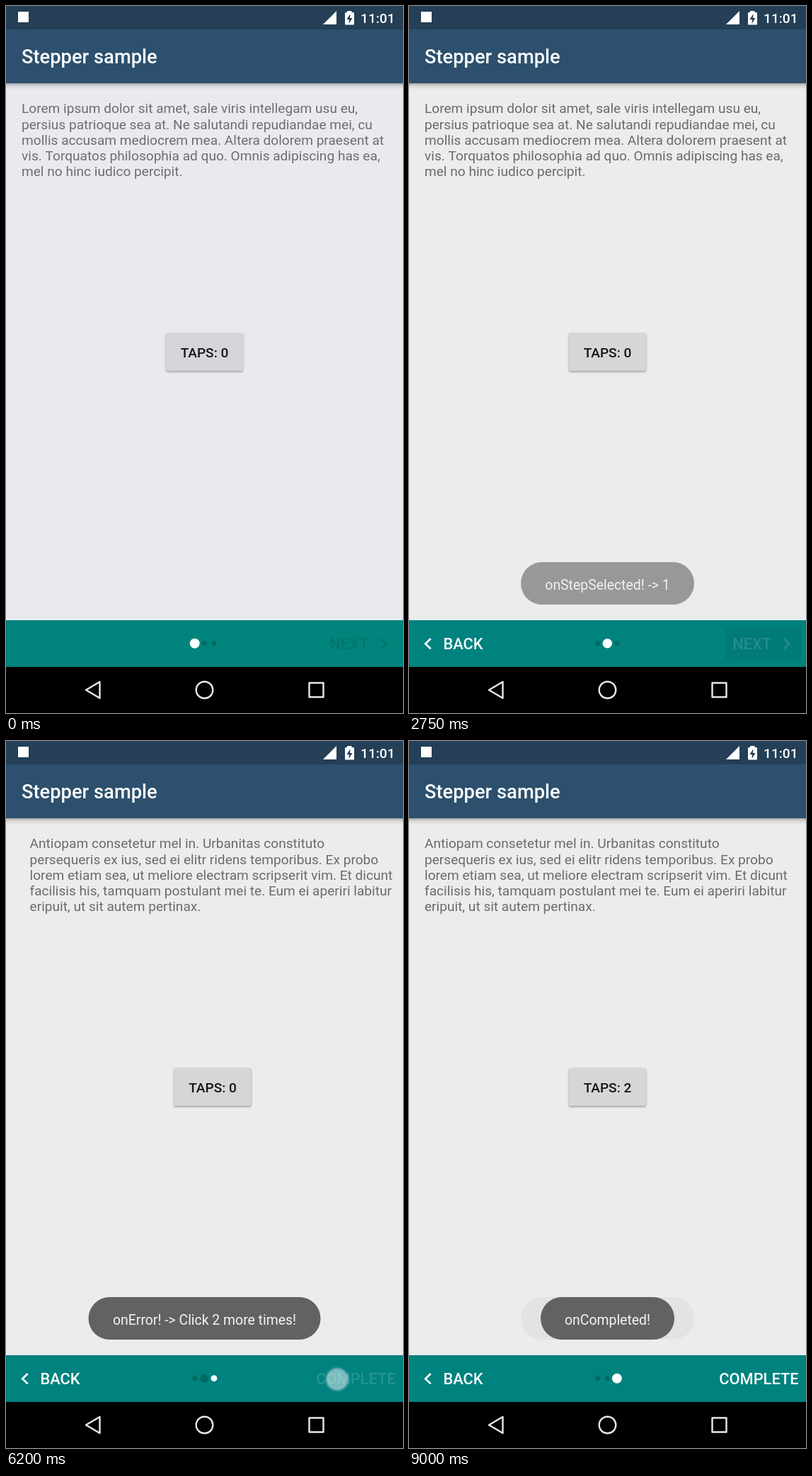
Animation, 561 px wide and 998 px high, one loop 9.25 s. Source, as an HTML page with a canvas:

```html
<!DOCTYPE html>
<html lang="en">
<head>
<meta charset="utf-8">
<title>Stepper sample</title>
<style>
  html, body { margin: 0; width: 100%; height: 100%; overflow: hidden; background: #000; }
  canvas { display: block; width: 561px; height: 998px; }
</style>
</head>
<body>
<canvas id="stage" width="561" height="998"></canvas>
<script>
const W = 561, H = 998, LOOP = 9250, TICK = 50;
const stage = document.getElementById('stage').getContext('2d');
const layer = document.createElement('canvas');
layer.width = W;
layer.height = H;
const layerCtx = layer.getContext('2d');
let g = stage;

const LOREM = [
  'Lorem ipsum dolor sit amet, sale viris intellegam usu eu,',
  'persius patrioque sea at. Ne salutandi repudiandae mei, cu',
  'mollis accusam mediocrem mea. Altera dolorem praesent at',
  'vis. Torquatos philosophia ad quo. Omnis adipiscing has ea,',
  'mel no hinc iudico percipit.'
];
const ANTIOPAM = [
  'Antiopam consetetur mel in. Urbanitas constituto',
  'persequeris ex ius, sed ei elitr ridens temporibus. Ex probo',
  'lorem etiam sea, ut meliore electram scripserit vim. Et dicunt',
  'facilisis his, tamquam postulant mei te. Eum ei aperiri labitur',
  'eripuit, ut sit autem pertinax.'
];
const PAGES = [LOREM, LOREM, ANTIOPAM];

// Times at which steps 1 and 2 are selected, and the two counted taps per page.
const SELECT = [2500, 6092];
const COUNTS = [[1550, 1850], [4450, 4750], [7100, 7400]];

const TOASTS = [
  { text: 'onStepSelected! -> 1', half: 122.5, from: 2565, to: 4515 },
  { text: 'onError! -> Click 2 more times!', half: 164, from: 4515, to: 6515 },
  { text: 'onStepSelected! -> 2', half: 122.5, from: 6515, to: 8515 },
  { text: 'onCompleted!', half: 94.5, from: 8515, to: Infinity }
];

const TOUCHES = [
  { x: 253, y: 489, down: 1400, up: 1550, gone: 1700 },
  { x: 253, y: 489, down: 1700, up: 1850, gone: 2050 },
  { x: 480, y: 905, down: 2350, up: 2490, gone: 2700 },
  { x: 489, y: 903, down: 3400, up: 3550, gone: 3800 },
  { x: 253, y: 489, down: 4300, up: 4450, gone: 4600 },
  { x: 253, y: 489, down: 4600, up: 4750, gone: 4950 },
  { x: 468, y: 901, down: 6050, up: 6120, gone: 6300 },
  { x: 253, y: 489, down: 7000, up: 7100, gone: 7250 },
  { x: 253, y: 489, down: 7300, up: 7400, gone: 7550 },
  { x: 480, y: 909, down: 8350, up: 8500, gone: 8700 }
];

const clamp = v => Math.max(0, Math.min(1, v));
const roboto = (size, weight = 400) => `${weight} ${size}px Roboto, sans-serif`;
const toastFont = pickToastFont();

// Uses the condensed face when there is one, else a smaller regular size.
function pickToastFont() {
  const condensed = 'condensed 21.8px Roboto, sans-serif';
  const width = font => {
    stage.font = font;
    return stage.measureText(TOASTS[0].text).width;
  };
  return width(condensed) < width(roboto(21.8)) - 5 ? condensed : roboto(19.4);
}

function rect(x, y, w, h, color) {
  g.fillStyle = color;
  g.fillRect(x, y, w, h);
}

function pill(x, y, w, h, r, color) {
  g.fillStyle = color;
  g.beginPath();
  g.roundRect(x, y, w, h, r);
  g.fill();
}

function disc(x, y, r, color) {
  g.fillStyle = color;
  g.beginPath();
  g.arc(x, y, r, 0, Math.PI * 2);
  g.fill();
}

function path(points, closed) {
  g.beginPath();
  points.forEach(([x, y]) => g.lineTo(x, y));
  if (closed) g.closePath();
}

function label(text, x, y, font, color, align = 'left') {
  g.font = font;
  g.fillStyle = color;
  g.textAlign = align;
  g.fillText(text, x, y);
}

function drawAppBar() {
  const shade = g.createLinearGradient(0, 109, 0, 118);
  shade.addColorStop(0, 'rgba(0,0,0,.3)');
  shade.addColorStop(0.4, 'rgba(0,0,0,.1)');
  shade.addColorStop(1, 'rgba(0,0,0,0)');
  rect(0, 109, W, 9, shade);
  rect(0, 0, W, 33, '#243f56');
  rect(0, 33, W, 76, '#2c506d');
  label('Stepper sample', 22, 81, roboto(27.3, 500), '#fff');

  rect(17, 8, 15, 15, '#fff');
  g.fillStyle = '#fff';
  path([[448, 26], [467, 26], [467, 7]], true);
  g.fill();
  rect(482, 7, 6.5, 3, '#fff');
  pill(479, 9, 13, 17.5, 1, '#fff');
  g.fillStyle = '#243f56';
  path([[486.5, 11], [481.5, 19], [485, 19], [484.5, 25], [489.5, 17], [486, 17]], true);
  g.fill();
  label('11:01', 549.5, 24, roboto(19.1, 500), '#fff', 'right');
}

function drawPage(index, x, t) {
  const early = t < 1400;
  const taps = COUNTS[index].filter(time => t >= time).length;
  g.save();
  g.translate(x, 0);
  PAGES[index].forEach((line, i) =>
    label(line, 22, 151.3 + i * 22.2, roboto(19.1), early ? '#6d6e72' : '#6b6b6b'));
  g.save();
  g.shadowColor = 'rgba(0,0,0,.35)';
  g.shadowBlur = 3;
  g.shadowOffsetY = 1.5;
  pill(226, 461.5, 109, 53.5, 2.5, early ? '#d5d6da' : '#d6d6d6');
  g.restore();
  label('TAPS: ' + taps, 280.5, 495.5, roboto(19.1, 500), '#151515', 'center');
  g.restore();
}

function drawPages(step, t) {
  const start = step ? SELECT[step - 1] : -LOOP;
  const offset = W * (1 - clamp((t - start) / 200)) ** 5;
  if (offset > 0.5) drawPage(step - 1, offset - W, t);
  drawPage(step, offset, t);
}

function chevron(x, dir, color) {
  g.strokeStyle = color;
  g.lineWidth = 2.7;
  path([[x, 893], [x + dir * 7.5, 900.2], [x, 907.4]]);
  g.stroke();
}

function drawDots(step, t) {
  const start = step ? SELECT[step - 1] : -LOOP;
  const grow = (1 - Math.cos(Math.PI * clamp((t - start) / 300))) / 2;
  for (let i = 0; i < 3; i++) {
    const size = i === step ? grow : i === step - 1 ? 1 - grow : 0;
    disc(266.7 + i * 13.6, 899.7, 3.4 + 3.6 * size, i === step ? '#fff' : '#006863');
  }
}

function drawBottomBar(step, t) {
  rect(0, 867, W, 66, t < 1400 ? '#00847b' : '#00827f');
  const ready = t >= COUNTS[step][1];
  const pressed = TOUCHES.some(p => p.y > 867 && t >= p.down + 50 && t < p.up);
  const color = t < 1400 ? 'rgba(0,50,50,.16)'
    : !ready ? 'rgba(255,255,255,.14)'
    : pressed ? '#b9c0c0' : '#fff';

  if (step === 1) {
    const ripple = 0.09 * (1 - clamp((t - SELECT[0]) / 550));
    pill(447, 877, 108, 46, 3, `rgba(0,0,0,${ripple})`);
  }
  if (step > 0) {
    chevron(30.7, -1, '#fff');
    label('BACK', 48.5, 908.3, roboto(21.8, 500), '#fff');
  }
  if (step < 2) {
    label('NEXT', 457.2, 908.3, roboto(21.8, 500), color);
    chevron(530, 1, color);
  } else {
    label('COMPLETE', 550.5, 908.3, roboto(21.8, 500), color, 'right');
  }
  drawDots(step, t);
}

function drawSystemBar() {
  rect(0, 933, W, 65, '#000');
  g.strokeStyle = '#e8e8e8';
  g.lineWidth = 2.4;
  g.lineJoin = 'round';
  path([[113, 965.5], [132.5, 954], [132.5, 977]], true);
  g.stroke();
  g.beginPath();
  g.arc(280.5, 965.5, 11.8, 0, Math.PI * 2);
  g.stroke();
  g.strokeRect(428.5, 955.5, 20, 20);
  g.lineJoin = 'miter';
}

function drawToast({ text, half, from, to }, t) {
  const enter = 1 - (1 - clamp((t - from) / 500)) ** 2;
  const exit = 1 - clamp((t - to) / 500) ** 2;
  const alpha = Math.min(enter, exit);
  if (alpha <= 0) return;
  g = layerCtx;
  g.clearRect(0, 0, W, H);
  pill(280.5 - half, 785, half * 2, 60, 30, '#626262');
  label(text, 280.5, 824, toastFont, '#f4f4f4', 'center');
  g = stage;
  g.globalAlpha = alpha;
  g.drawImage(layer, 0, 0);
  g.globalAlpha = 1;
}

function drawTouch({ x, y, down, up, gone }, t) {
  if (t < down || t >= gone) return;
  g.globalAlpha = 1 - clamp((t - up) / (gone - up));
  const halo = g.createRadialGradient(x, y, 14, x, y, 19);
  halo.addColorStop(0, 'rgba(225,235,250,.45)');
  halo.addColorStop(1, 'rgba(225,235,250,0)');
  disc(x, y, 19, halo);
  disc(x, y, 14.5, 'rgba(255,255,255,.58)');
  g.strokeStyle = 'rgba(160,180,215,.65)';
  g.lineWidth = 2;
  g.beginPath();
  g.arc(x, y, 15, 0, Math.PI * 2);
  g.stroke();
  g.globalAlpha = 1;
}

function draw(time) {
  const t = Math.min(9000, Math.floor((time % LOOP) / TICK) * TICK);
  const step = SELECT.filter(start => t >= start).length;
  rect(0, 0, W, H, t < 1400 ? '#e9eaee' : '#ececec');
  drawPages(step, t);
  drawAppBar();
  drawBottomBar(step, t);
  drawSystemBar();
  TOASTS.forEach(toast => drawToast(toast, t));
  TOUCHES.forEach(touch => drawTouch(touch, t));
}

let origin;
function loop(now) {
  origin ??= now;
  draw(now - origin);
  requestAnimationFrame(loop);
}
draw(0);
requestAnimationFrame(loop);
</script>
</body>
</html>
```
